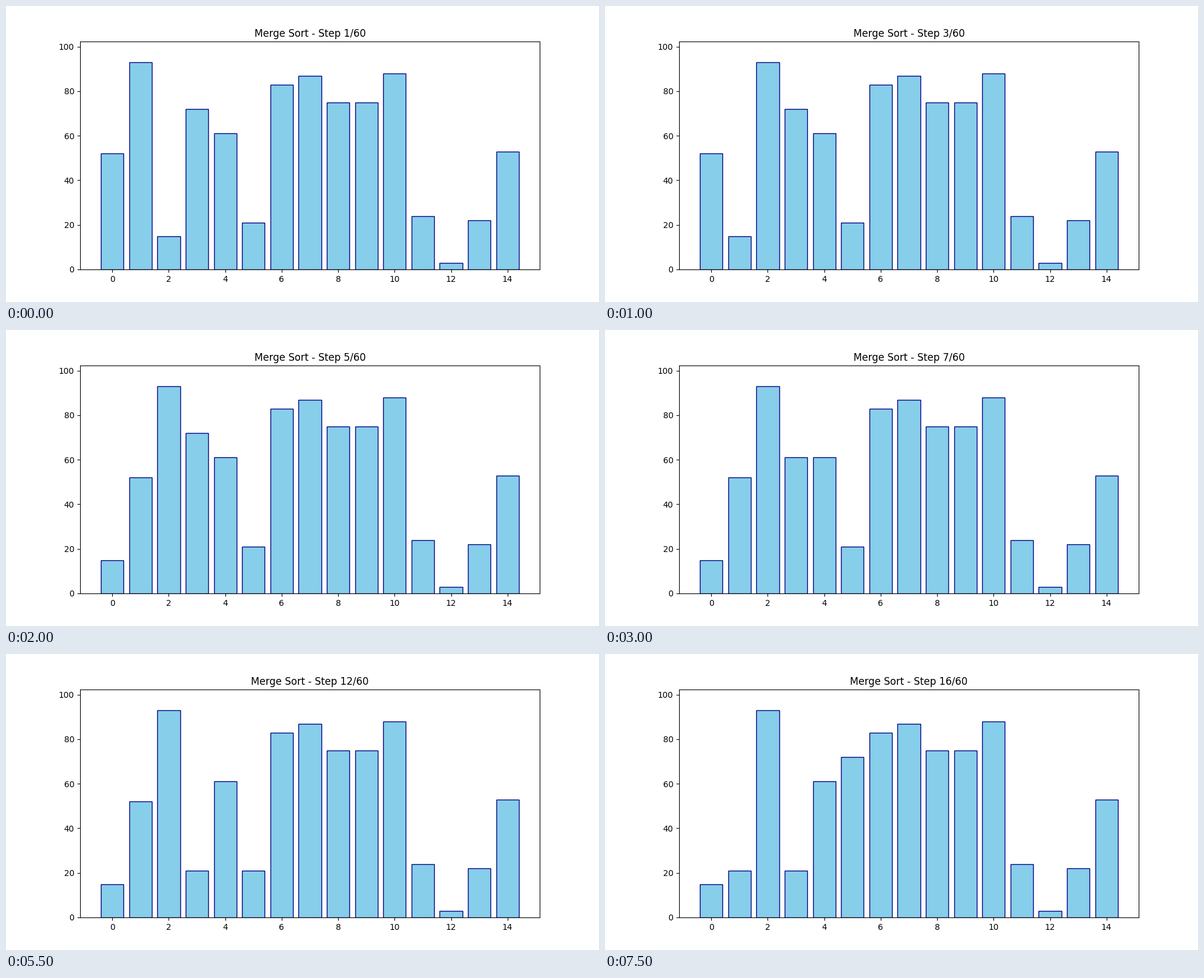
Recreate the animation shown at these times as a matplotlib script. Size 1000 by 500 pixels, loop 8 s.

```python
import matplotlib.pyplot as plt
from matplotlib.animation import FuncAnimation

VALUES = [52, 93, 15, 72, 61, 21, 83, 87, 75, 75, 88, 24, 3, 22, 53]
SHOWN = 16
STEP_MS = 500


def merge_sort(data, lo, hi):
    """Sort data[lo:hi] in place, yielding a copy after every write."""
    if hi - lo < 2:
        return
    mid = (lo + hi) // 2
    yield from merge_sort(data, lo, mid)
    yield from merge_sort(data, mid, hi)
    left, right = data[lo:mid], data[mid:hi]
    for k in range(lo, hi):
        take_left = left and (not right or left[0] <= right[0])
        data[k] = (left if take_left else right).pop(0)
        yield data.copy()


steps = [VALUES] + list(merge_sort(VALUES.copy(), 0, len(VALUES)))

fig, ax = plt.subplots(figsize=(10, 5), dpi=100)
bars = ax.bar(range(len(VALUES)), VALUES, color="skyblue", edgecolor="navy")
ax.set_ylim(0, max(VALUES) * 1.1)
title = ax.set_title("")


def update(i):
    for bar, height in zip(bars, steps[i]):
        bar.set_height(height)
    title.set_text(f"Merge Sort - Step {i + 1}/{len(steps)}")
    return [*bars, title]


anim = FuncAnimation(fig, update, frames=SHOWN, interval=STEP_MS,
                     repeat=True, repeat_delay=0, blit=False)
plt.show()
```
